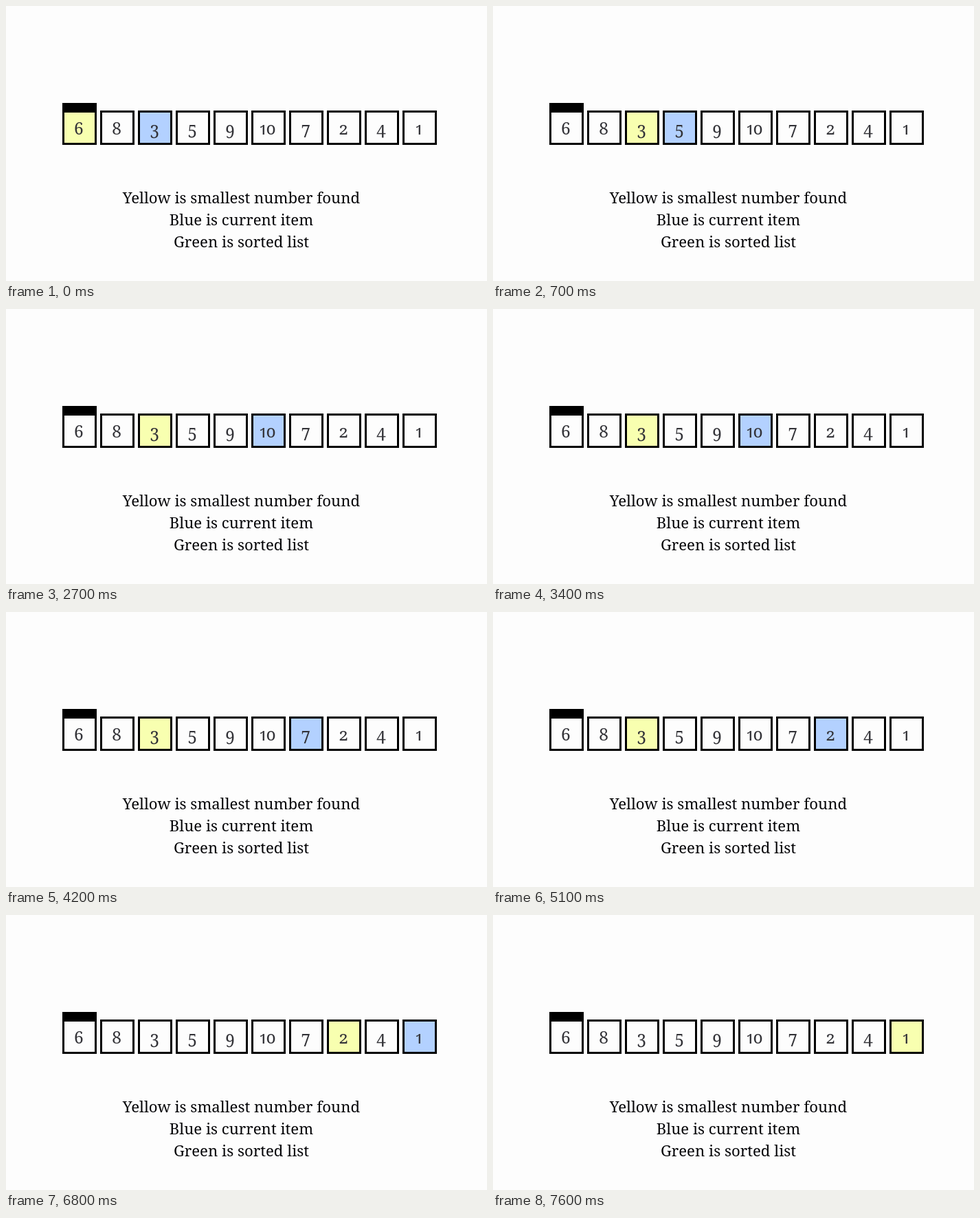
Write an HTML page that moves like this. It is 700x400 px and loops after 8 s.

```html
<!DOCTYPE html>
<html lang="en">
<head>
<meta charset="utf-8">
<title>Selection sort</title>
<style>
html, body { margin: 0; width: 100%; height: 100%; overflow: hidden; background: #fdfdfd; }
svg { display: block; width: 700px; height: 400px; }
text { font-family: "Noto Serif", Georgia, serif; text-anchor: middle; }
.caption { font-size: 22.2px; fill: #050508; }
.digit { font-size: 24.5px; fill: #333338; font-variant-numeric: oldstyle-nums proportional-nums; }
rect { stroke: #000; stroke-width: 3; }
</style>
</head>
<body>
<svg viewBox="0 0 700 400">
  <g id="cells"></g>
  <path d="M82 141h50v14h-50z"/>
  <text class="caption" x="342.5" y="287">Yellow is smallest number found</text>
  <text class="caption" x="342.5" y="319">Blue is current item</text>
  <text class="caption" x="342.5" y="351">Green is sorted list</text>
</svg>
<script>
const LOOP = 8000, STEP = 1000, PITCH = 55;
const FIRST = 2, ELAPSED = 300; // the loop opens 300 ms into the look at the third item
const PLAIN = '#fdfdfd', SMALLEST = '#f8ffb0', CURRENT = '#b3d1ff';
const values = [6, 8, 3, 5, 9, 10, 7, 2, 4, 1];

function add(name, attrs, text = '') {
  const el = document.createElementNS('http://www.w3.org/2000/svg', name);
  for (const key in attrs) el.setAttribute(key, attrs[key]);
  el.textContent = text;
  return document.getElementById('cells').appendChild(el);
}

const boxes = values.map((value, i) => {
  const left = 82 + PITCH * i;
  const box = add('rect', { x: left + 1.5, y: 153.5, width: 47, height: 47 });
  add('text', { class: 'digit', x: left + 24, y: 186.5 }, value);
  return box;
});

// Each item is blue for one step; a new minimum turns yellow halfway through.
function draw() {
  const time = performance.now() % LOOP + ELAPSED;
  const current = Math.min(FIRST + Math.floor(time / STEP), values.length - 1);
  const compared = time - (current - FIRST) * STEP >= STEP / 2;
  const seen = values.slice(0, compared ? current + 1 : current);
  const smallest = seen.indexOf(Math.min(...seen));
  boxes.forEach((box, i) => box.setAttribute('fill',
    i === smallest ? SMALLEST : i === current && smallest !== current ? CURRENT : PLAIN));
  requestAnimationFrame(draw);
}
draw();
</script>
</body>
</html>
```
